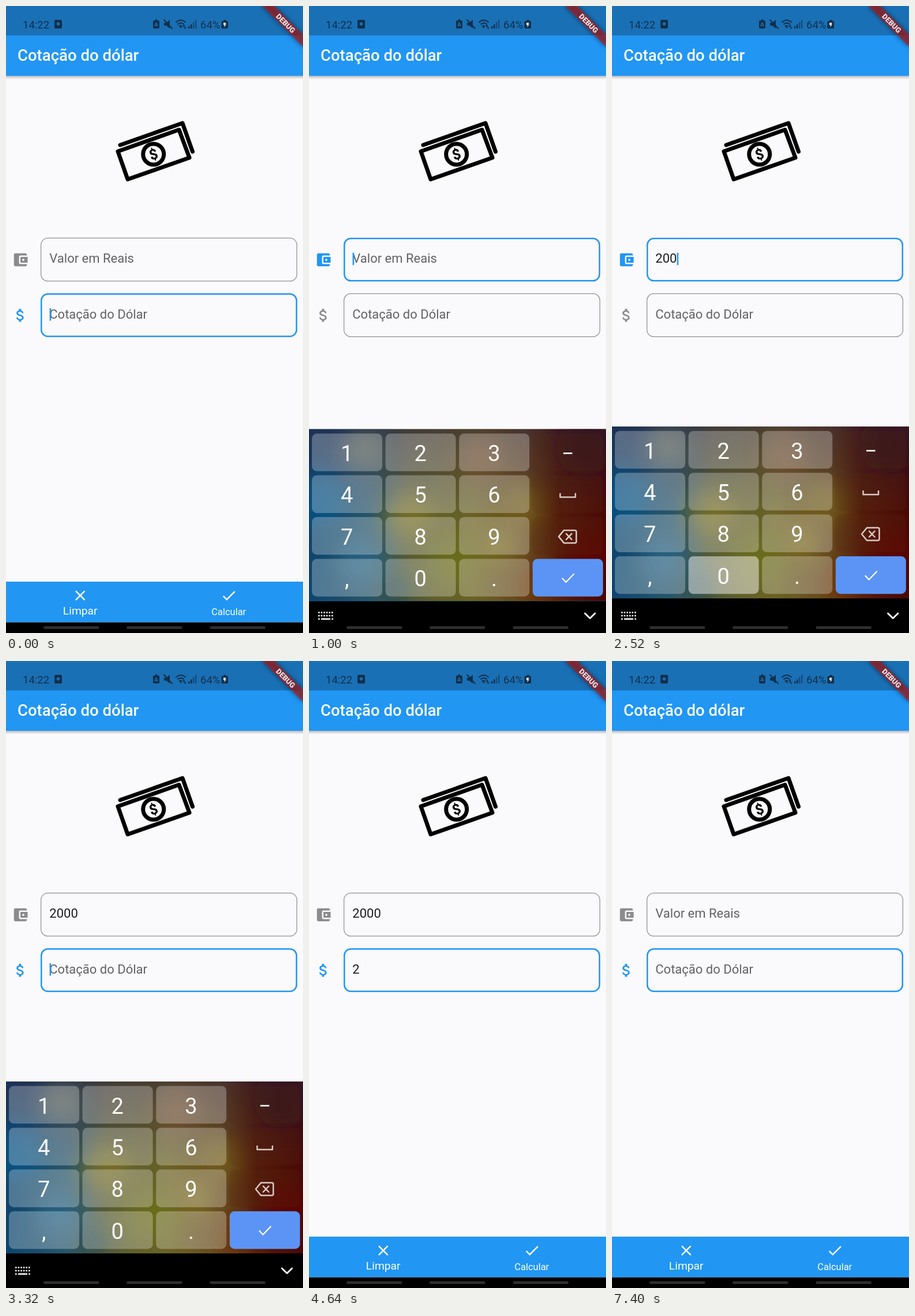
An HTML page for the animation above (7920 ms loop, 515 by 1087 pixels).

```html
<!DOCTYPE html>
<html lang="pt">
<head>
<meta charset="utf-8">
<title>Cotação do dólar</title>
<style>
html, body { margin: 0; width: 100%; height: 100%; overflow: hidden; background: #faf9fc; }
svg { display: block; width: 100vw; height: 100vh; }
text { font: 22px Roboto, sans-serif; fill: #1c1c1e; white-space: pre; }
.label { fill: #626164; }
.white { fill: #fff; }
.mid { text-anchor: middle; }
.line { fill: none; stroke-linejoin: round; stroke-linecap: round; }
</style>
</head>
<body>
<svg viewBox="0 0 515 1087" preserveAspectRatio="none">
  <defs>
    <linearGradient id="shade" x2="0" y2="1">
      <stop stop-color="#000" stop-opacity=".26"/><stop offset="1" stop-color="#000" stop-opacity="0"/>
    </linearGradient>
    <linearGradient id="wall">
      <stop stop-color="#0c456f"/><stop offset=".2" stop-color="#29566a"/>
      <stop offset=".34" stop-color="#595d35"/><stop offset=".55" stop-color="#6b6224"/>
      <stop offset=".73" stop-color="#674a20"/><stop offset=".84" stop-color="#541c0c"/>
      <stop offset="1" stop-color="#4a0807"/>
    </linearGradient>
    <linearGradient id="dusk" x2="0" y2="1">
      <stop stop-color="#2b1c3a" stop-opacity=".5"/><stop offset=".5" stop-color="#2b1c3a" stop-opacity="0"/>
    </linearGradient>
    <clipPath id="bar"><path d="M0 998h515v70.5h-515z"/></clipPath>
    <clipPath id="panel"><path d="M0 729h515v298h-515z"/></clipPath>
    <filter id="blur" x="-60%" y="-60%" width="220%" height="220%"><feGaussianBlur stdDeviation="16"/></filter>
    <filter id="soft" x="-30%" y="-200%" width="160%" height="500%"><feGaussianBlur stdDeviation="4"/></filter>
  </defs>

  <path fill="#faf9fc" d="M0 0h515v1087H0z"/>
  <path fill="url(#shade)" d="M0 121h515v6H0z"/>
  <path fill="#2196f3" d="M0 51h515v70H0z"/>
  <path fill="#1a70b5" d="M0 0h515v51H0z"/>
  <text x="20" y="95" class="white" style="font-size:27.5px;font-weight:500">Cotação do dólar</text>

  <g fill="#10304c" stroke="#10304c" stroke-width="0">
    <text x="29" y="38.5" style="font-size:18.5px;fill:#10304c">14:22</text>
    <text x="337" y="38.5" style="font-size:18.5px;fill:#10304c">64%</text>
    <rect x="84" y="24" width="13" height="15" rx="2"/>
    <circle cx="90.500" cy="31" r="2.700" fill="#1a70b5"/>
    <path d="M257 25h2v-2h3v2h2q2 0 2 2v10q0 2-2 2h-7q-2 0-2-2v-10q0-2 2-2z"/>
    <path class="line" stroke="#1a70b5" stroke-width="1.500" d="M258 34l2.500-5 2.500 5z"/>
    <path d="M274 29h4l6-5v15l-6-5h-4z"/>
    <path class="line" stroke-width="2" d="M274 24l14 15"/>
    <path class="line" stroke-width="2" d="M295 28q8-7 16 0M298 31.500q5-4 10 0M300.500 35q2.500-2 4 0"/>
    <path d="M301 36h4l-2 3zM306 36l2.500-4 2.500 4zM308 37h5l-2.500 3z"/>
    <path d="M316 35h2.500v4h-2.500zM320 32h2.500v7h-2.500z"/>
    <path d="M324 28h2.500v11h-2.500zM328 24h2.500v15h-2.500z" opacity=".55"/>
    <path d="M375 26h2.500v-2h4v2h2q1.500 0 1.500 1.500v10q0 1.500-1.500 1.500h-8.500q-1.500 0-1.500-1.500v-10q0-1.500 1.500-1.500z"/>
    <path fill="#e4eef6" d="M377 29h5l-2 3h2l-4 5 1-4h-2z"/>
  </g>

  <g transform="translate(515) rotate(45)">
    <path fill="#000" opacity=".5" filter="url(#soft)" d="M-50 35h100v15h-100z"/>
    <path fill="#b71c1c" opacity=".627" d="M-50 35h100v15h-100z"/>
    <text y="47" class="white mid" style="font-size:12.75px;font-weight:900;fill:#ece6ea">DEBUG</text>
  </g>

  <g class="line" stroke="#000" stroke-width="7">
    <path d="M194 252L300 214.500 318 263 211 300.500zM198 241L306 203 323.500 252.500"/>
    <circle cx="255.700" cy="257" r="18"/>
  </g>
  <text class="mid" transform="translate(255.700 257) rotate(-19)" y="9" style="font-size:25px;font-weight:700;fill:#000">$</text>

  <g id="fields"></g>
  <g id="result">
    <text x="30" y="634">Com 2000 reais é possível comprar 1000.00</text>
    <text x="30" y="660">dólares a 2 cada</text>
  </g>

  <path fill="#2196f3" d="M0 998h515v70.500H0z"/>
  <circle id="ripple" cy="1033" fill="#d8dce0" clip-path="url(#bar)"/>
  <g class="white">
    <path transform="translate(113.750 1007) scale(1.250)" d="M19 6.410L17.590 5 12 10.590 6.410 5 5 6.410 10.590 12 5 17.590 6.410 19 12 13.410 17.590 19 19 17.590 13.410 12z"/>
    <path transform="translate(371.500 1007) scale(1.250)" d="M9 16.170L4.830 12l-1.420 1.410L9 19 21 7l-1.410-1.410z"/>
    <text x="128.700" y="1054.500" class="white mid" style="font-size:19.25px">Limpar</text>
    <text x="386.200" y="1055.500" class="white mid" style="font-size:16.5px">Calcular</text>
  </g>

  <g id="keyboard">
    <path fill="#000" d="M0 1027h515v60H0z"/>
    <path fill="url(#wall)" d="M0 729h515v298H0z"/>
    <path fill="url(#dusk)" d="M0 729h515v298H0z"/>
    <g clip-path="url(#panel)"><g id="clouds" filter="url(#blur)"></g></g>
    <g id="keys"></g>
    <path fill="#fff" d="M441 769.700h15.500v2.600h-15.500z"/>
    <g class="line" stroke="#d9cbc6" stroke-width="2.500">
      <path d="M435.500 841v6h26.500v-6"/>
      <path d="M442 904.500h19q2.500 0 2.500 2.500v17q0 2.500-2.500 2.500h-19l-9-11zM446 910.500l9.500 10m0-10l-9.500 10"/>
      <path stroke="#fff" stroke-width="2.200" d="M439.500 988l6 6.500 13.500-14"/>
    </g>
  </g>

  <path fill="#000" d="M0 1068.500h515v18.500H0z"/>
  <g id="tools" class="line" stroke="#fff">
    <path stroke-width="2.600" stroke-linecap="butt" style="stroke-linecap:butt" stroke-dasharray="2.600 2" d="M16 1051.500h26M16 1057h26"/>
    <path stroke-width="2.600" style="stroke-linecap:butt" d="M16 1062.700h2.600M21 1062.700h16M39.200 1062.700h2.600"/>
    <path stroke-width="2.800" d="M478.500 1053l8.700 8.500 8.700-8.500"/>
  </g>
  <g fill="#2f2f2f">
    <rect x="65" y="1075.300" width="96.500" height="4.800" rx="2.400"/>
    <rect x="209" y="1075.300" width="96.500" height="4.800" rx="2.400"/>
    <rect id="back" height="4.800" rx="2.400"/>
  </g>
</svg>
<script>
const LOOP = 7920, STEP = 40, PRESS = 100, CLEAR = 7200;
const BLUE = [33, 150, 243], GREY = [145, 144, 148];
const WALLET = 'M21 18v1c0 1.100-.9 2-2 2H5c-1.110 0-2-.9-2-2V5c0-1.100.89-2 2-2h14c1.100 0 2 .9 2 2v1h-9c-1.110 0-2 .9-2 2v8c0 1.100.89 2 2 2h9zm-9-2h10V8H12v8zm4-2.500c-.83 0-1.500-.67-1.500-1.500s.67-1.500 1.500-1.500 1.500.67 1.500 1.500-.67 1.500-1.500 1.500z';
const MONEY = 'M11.800 10.900c-2.270-.59-3-1.200-3-2.150 0-1.090 1.010-1.850 2.700-1.850 1.780 0 2.440.85 2.500 2.100h2.210c-.07-1.720-1.120-3.300-3.210-3.810V3h-3v2.160c-1.940.42-3.500 1.680-3.500 3.610 0 2.310 1.910 3.460 4.700 4.130 2.500.6 3 1.480 3 2.410 0 .69-.49 1.790-2.700 1.790-2.060 0-2.870-.92-2.980-2.100h-2.200c.12 2.190 1.760 3.420 3.680 3.830V21h3v-2.150c1.950-.37 3.500-1.500 3.500-3.550 0-2.840-2.430-3.810-4.700-4.400z';

const $ = id => document.getElementById(id);
const ramp = (t, a, b) => Math.min(1, Math.max(0, (t - a) / (b - a)));
const easeOut = p => 1 - (1 - p) ** 2;
const smooth = p => p * p * (3 - 2 * p);
const within = (t, a, b) => t >= a && t < b;

function add(parent, tag, attrs, text = '') {
  const el = document.createElementNS('http://www.w3.org/2000/svg', tag);
  set(el, attrs);
  el.textContent = text;
  return parent.appendChild(el);
}
function set(el, attrs) {
  for (const k in attrs) el.setAttribute(k, attrs[k]);
}

// Each typed character appears when its key is released.
const fields = [
  { y: 402, name: 'Valor em Reais', icon: WALLET, typed: [['2', 1700], ['0', 2140], ['0', 2300], ['0', 2460]] },
  { y: 498.3, name: 'Cotação do Dólar', icon: MONEY, typed: [['2', 3780]] }
];
const presses = fields.flatMap(f => f.typed);
const cursorOff = [[1240, 1800], [3600, 3880], [4400, 4920], [5400, 5880], [6400, 6920], [7400, LOOP]];

for (const f of fields) {
  f.glyph = add($('fields'), 'path', { d: f.icon, transform: `translate(10 ${f.y + 23}) scale(1.25)` });
  f.box = add($('fields'), 'rect', { fill: 'none' });
  f.label = add($('fields'), 'text', { x: 75.3, y: f.y + 43.2, class: 'label' }, f.name);
  f.value = add($('fields'), 'text', { x: 75.3, y: f.y + 43.2 });
}
const cursor = add($('fields'), 'rect', { width: 2.5, height: 21.5, fill: '#2196f3' });

const clouds = [
  [20, 850, 45, '#0a5c98'], [90, 960, 40, '#2a6a90'], [95, 765, 35, '#6a6a50'], [175, 880, 40, '#8a7a20'],
  [250, 960, 45, '#6f7418'], [300, 780, 40, '#7a5038'], [370, 860, 35, '#7a6a10'], [400, 1000, 40, '#703008'],
  [480, 760, 50, '#32101c'], [490, 950, 45, '#640800'], [150, 1010, 30, '#1c4a58'], [330, 930, 28, '#8c7e24']
];
for (const [cx, cy, r, fill] of clouds) add($('clouds'), 'circle', { cx, cy, r, fill, opacity: 0.55 });

const keys = {};
['123-', '456_', '789<', ',0.*'].forEach((row, j) => [...row].forEach((char, i) => {
  const x = 5 + i * 127.6, y = 736.8 + j * 72.4;
  const special = i === 3;
  const fill = char === '*' ? '#5c94f5' : special ? 'rgba(90,45,15,.2)' : 'rgba(255,255,255,.27)';
  keys[char] = add($('keys'), 'rect', { x, y, width: 122, height: 65.3, rx: 8.5, fill });
  if (!special) add($('keys'), 'text', { x: x + 60.7, y: y + 47.8, class: 'white mid', style: 'font-size:38px' }, char);
}));

function drawField(f, focus, active, t) {
  const w = 1.25 + 1.25 * focus;
  const color = GREY.map((c, i) => Math.round(c + (BLUE[i] - c) * focus));
  set(f.box, {
    x: 60 + w / 2, y: f.y - 0.2 + w / 2, width: 445 - w, height: 75.8 - w, rx: 12.5 - w / 2,
    stroke: `rgb(${color})`, 'stroke-width': w
  });
  f.glyph.setAttribute('fill', active ? '#2196f3' : '#8b8a8d');
  const start = f.typed[0][1] + PRESS;
  const hidden = easeOut(ramp(t, start, start + 200)) - easeOut(ramp(t, CLEAR, CLEAR + 200));
  f.label.setAttribute('opacity', 1 - hidden);
  f.value.textContent = t < CLEAR ? f.typed.filter(k => t >= k[1] + PRESS).map(k => k[0]).join('') : '';
}

function draw(t) {
  const focus = ramp(t, 20, 220) - ramp(t, 3060, 3260);
  const first = within(t, 40, 3080);
  drawField(fields[0], focus, first, t);
  drawField(fields[1], 1 - focus, !first, t);

  const field = fields[first ? 0 : 1];
  set(cursor, {
    x: 75.6 + 12.35 * field.value.textContent.length, y: field.y + 25.7,
    opacity: cursorOff.some(([a, b]) => within(t, a, b)) ? 0 : 1
  });
  $('result').setAttribute('opacity', within(t, 5200, CLEAR) ? 1 : 0);

  // Button ripples: calculate, then clear.
  const [tap, cx] = t < 6000 ? [5100, 386] : [7100, 129];
  const p = ramp(t, tap, tap + 300);
  set($('ripple'), { cx, r: 20 + 100 * easeOut(p), opacity: p > 0 ? 0.32 * (1 - p) : 0 });

  const open = 1 - (1 - ramp(t, 700, 1090)) ** 3;
  const shut = smooth(ramp(t, 4320, 4640));
  $('keyboard').setAttribute('transform', `translate(0 ${358 * (1 - open + shut)})`);
  $('tools').setAttribute('opacity', t < 4300 ? ramp(t, 760, 920) : 0);
  for (const c of '20') {
    const down = presses.some(([k, at]) => k === c && within(t, at, at + PRESS));
    keys[c].setAttribute('fill', `rgba(255,255,255,${down ? 0.48 : 0.27})`);
  }

  const lift = ramp(t, 4240, 4320) - ramp(t, 4360, 4560);
  set($('back'), { x: 353.5 - 1.8 * lift, y: 1075.3 - 4.5 * lift, width: 96.5 + 3.6 * lift });
}

const begin = performance.now();
function tick() {
  const t = (performance.now() - begin) % LOOP;
  draw(t - t % STEP);
  requestAnimationFrame(tick);
}
tick();
</script>
</body>
</html>
```
